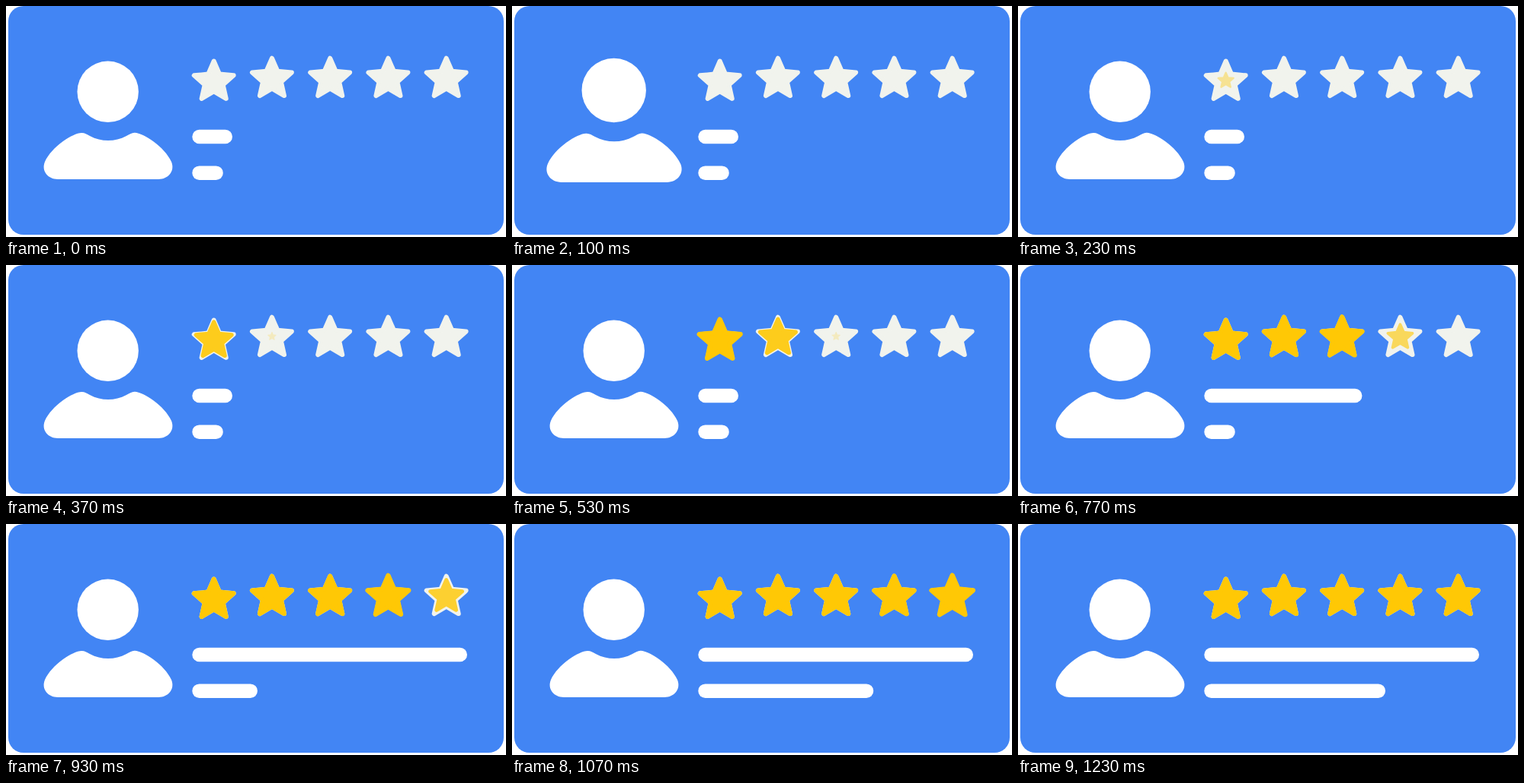
Animation, 656 px wide and 304 px high, one loop 1.26 s. Source, as an HTML page:

```html
<!DOCTYPE html>
<html lang="en">
<head>
<meta charset="utf-8">
<title>Five-star review card</title>
<style>
  html, body { margin: 0; width: 100%; height: 100%; overflow: hidden; background: #fff; }
  svg { display: block; }
</style>
</head>
<body>
<svg width="656" height="304" viewBox="0 0 656 304">
  <rect x="3" width="650" height="301" rx="20" fill="#4285f4"/>
  <g fill="#fff">
    <g id="person">
      <circle cx="133.7" cy="112.8" r="40.2"/>
      <path d="M99 167C103 166.8 106 169 110 171C125 179 143 179 158 171C162 169 165 166.5 169 166.7C180 167 208 185 217 205C222 217 213 228 200 228H68C55 228 46 217 51 205C60 185 88 167 99 167Z"/>
    </g>
    <rect id="bar1" x="244.3" y="162.7" height="18.5" rx="9.25"/>
    <rect id="bar2" x="244.3" y="210.4" height="18.5" rx="9.25"/>
  </g>
  <g id="stars" stroke-width="6" stroke-linejoin="round"></g>
</svg>
<script>
const LOOP = 1260, FPS = 30, POP = 320, SETTLE = 140, OVERSHOOT = 1.05;
const byId = id => document.getElementById(id);
const progress = (t, start, length) => Math.min(1, Math.max(0, (t - start) / length));
const smooth = x => x * x * (3 - 2 * x);
const easeOut = x => 1 - (1 - x) ** 2;
const cubicInOut = x => x < .5 ? 4 * x ** 3 : 1 - 4 * (1 - x) ** 3;

// The star is centred on its bounding box, slightly above its radial centre.
const starPoints = Array.from({ length: 10 }, (_, i) => {
  const r = i % 2 ? 12.6 : 27.3, a = i * Math.PI / 5;
  return `${(r * Math.sin(a)).toFixed(2)},${(2.6 - r * Math.cos(a)).toFixed(2)}`;
}).join(' ');

function addStar(x, y, color) {
  const star = document.createElementNS('http://www.w3.org/2000/svg', 'polygon');
  star.setAttribute('points', starPoints);
  star.setAttribute('fill', color);
  star.setAttribute('stroke', color);
  star.setAttribute('transform', `translate(${x} ${y})`);
  byId('stars').append(star);
  return star;
}

const stars = [168, 335, 502, 652, 767].map((start, i) => {
  const x = 272.7 + 76.25 * i, y = i ? 93.4 : 97.2;
  addStar(x, y, '#f1f3ed');
  return { x, y, start, node: addStar(x, y, '#ffc805') };
});

function draw(t) {
  const pulse = 1 + .05 * Math.sin(Math.PI * progress(t, 0, 210)) ** 2;
  byId('person').setAttribute('transform',
    `translate(133.7 150) scale(${pulse}) translate(-133.7 -150)`);

  for (const { x, y, start, node } of stars) {
    const settle = smooth(progress(t, start + POP, SETTLE));
    const scale = OVERSHOOT * easeOut(progress(t, start, POP)) - (OVERSHOOT - 1) * settle;
    node.setAttribute('transform', `translate(${x} ${y}) scale(${scale})`);
    node.setAttribute('opacity', Math.min(1, scale));
  }

  byId('bar1').setAttribute('width', 52.7 + 308 * cubicInOut(progress(t, 600, 333)));
  byId('bar2').setAttribute('width', 40.5 + 197.2 * cubicInOut(progress(t, 805, 333)));
}

function tick() {
  const t = performance.now() % LOOP;
  draw(Math.floor((t + 4) * FPS / 1000) * 1000 / FPS);
  requestAnimationFrame(tick);
}
tick();
</script>
</body>
</html>
```
